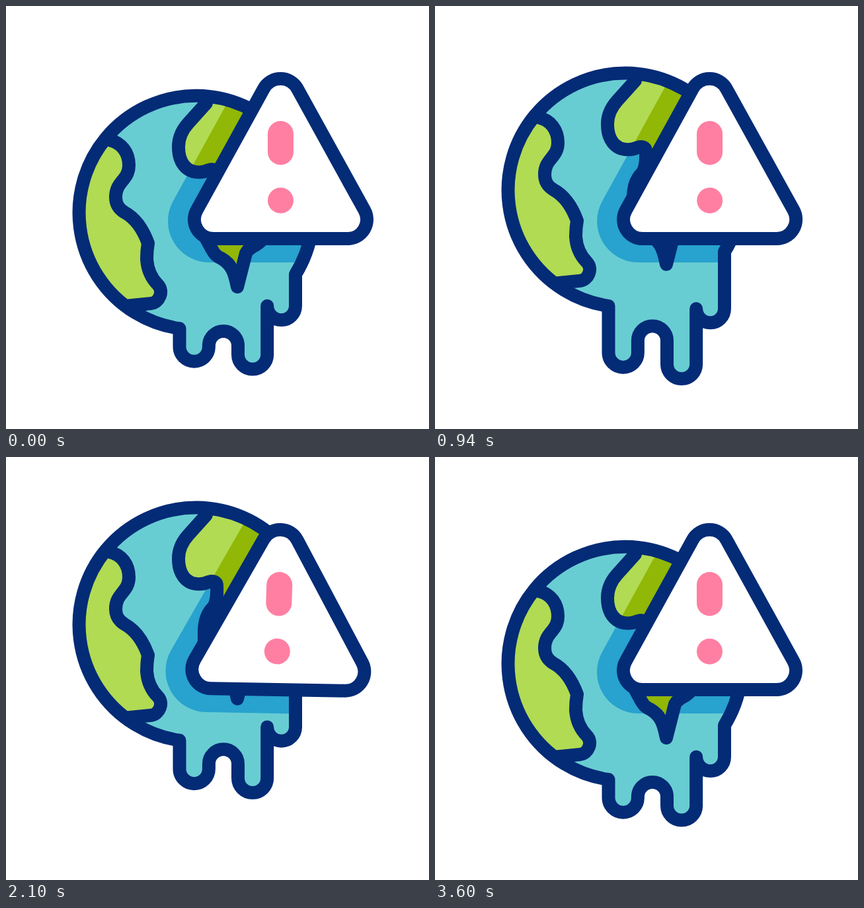
Animation, 640 px wide and 640 px high, one loop 3.62 s. Source, as an HTML page:

```html
<!DOCTYPE html>
<html lang="en">
<head>
<meta charset="utf-8">
<title>Melting globe warning</title>
<style>
  html, body { margin: 0; width: 100%; height: 100%; overflow: hidden; background: #fff; }
  svg { display: block; width: 100vw; height: 100vh; }
  .line { fill: none; stroke: #042b76; stroke-width: 20; stroke-linecap: round; stroke-linejoin: round; }
</style>
</head>
<body>
<svg viewBox="0 0 640 640">
  <defs>
    <path id="west" d="M157 203C175 207 186 222 186 241C186 264 166 265 166 289C166 301 171 307 179 312C194 320 207 337 215 359C213 370 213 377 213 383C214 399 219 411 230 422C239 432 232 448 220 450L180 454"/>
    <path id="east" d="M303 147L276 177C266 188 261 200 261 213C261 236 272 251.500 292 251.500C299 251.500 303 250 307 248C314 246 319 248 319 254C319.500 268 319 278 314 286C302 297 300 311 300 324V347L312 369C316 376 319 379 326 382C342 391 346 405 350 425L363 374C368 364 378 364 386 355L440 300"/>
    <path id="eastLand" d="M303 147L276 177C266 188 261 200 261 213C261 236 272 251.500 292 251.500C299 251.500 303 250 307 248C314 246 319 248 319 254C319.500 268 319 278 314 286C302 297 300 311 300 324V347L312 369C316 376 319 379 326 382C342 391 346 405 350 425L363 374C368 364 378 364 386 355L465 313.400A177 177 0 0 0 303 137Z"/>
    <path id="shade" d="M252.800 295.300A62.500 62.500 0 0 0 307.500 388H600V60H382.500Z"/>
    <clipPath id="bodyClip"><path class="body"/></clipPath>
    <clipPath id="eastClip"><use class="globe" href="#eastLand"/></clipPath>
  </defs>
  <path class="body" fill="#68cdd2"/>
  <g clip-path="url(#bodyClip)">
    <use class="swing" href="#shade" fill="#28a2ce"/>
    <g class="globe">
      <path fill="#b1db53" d="M157 203C175 207 186 222 186 241C186 264 166 265 166 289C166 301 171 307 179 312C194 320 207 337 215 359C213 370 213 377 213 383C214 399 219 411 230 422C239 432 232 448 220 450L180 454A177 177 0 0 1 157 203Z"/>
      <use href="#eastLand" fill="#b1db53"/>
    </g>
    <g clip-path="url(#eastClip)"><use class="swing" href="#shade" fill="#91b707"/></g>
    <g class="globe line">
      <use href="#west"/>
      <use href="#east"/>
    </g>
  </g>
  <path class="body line"/>
  <g class="swing">
    <path class="line" style="fill:#fff" d="M390 125A29 29 0 0 1 440.800 125L542.400 309A29 29 0 0 1 517 352H314A29 29 0 0 1 288.600 309Z"/>
    <g id="bang" fill="#ff7fa2">
      <rect x="396" y="174" width="39" height="66.500" rx="19.500"/>
      <circle cx="415.500" cy="294.200" r="19.500"/>
    </g>
  </g>
</svg>
<script>
const LOOP = 3620, END = 3600;
const $$ = s => document.querySelectorAll(s);
const bodies = $$('.body'), globes = $$('.globe'), swings = $$('.swing');
const bang = document.getElementById('bang');

const smooth = s => s * s * (3 - 2 * s);

// cubic-bezier(1/6, 0, 2/3, 1)
function quickStart(x) {
  let lo = 0, hi = 1;
  for (let i = 0; i < 24; i++) {
    const u = (lo + hi) / 2, v = 1 - u;
    if (u * v * v / 2 + 2 * u * u * v + u * u * u < x) lo = u; else hi = u;
  }
  return smooth(lo);
}

// evenly spaced keys, eased between neighbours
function keyed(t, values, ease = () => smooth) {
  const n = values.length - 1;
  const p = t / END * n;
  const i = Math.min(Math.floor(p), n - 1);
  return values[i] + (values[i + 1] - values[i]) * ease(i)(p - i);
}

function bodyPath(dy, melt) {
  const y = (base, grow = 0) => (base + dy + grow * melt).toFixed(2);
  const right = y(453.7, 38.7), mid = y(527.5, 49), gap = y(514, 26.6), left = y(515.5, 43.4);
  return `M438 ${y(406)}A177 177 0 1 0 262.500 ${y(488)}` +
    `V${left}A22.200 22.200 0 0 0 306.900 ${left}V${gap}` +
    `A22 22 0 0 1 351 ${gap}V${mid}A22.100 22.100 0 0 0 395.200 ${mid}V${right}` +
    `A21.400 21.400 0 0 0 438 ${right}Z`;
}

function draw(time) {
  const t = Math.min(time % LOOP, END);
  const dy = keyed(t, [0, -64, 0]);
  const melt = keyed(t, [0, 1, 0, 1, 0], i => i === 2 ? quickStart : smooth);
  const angle = keyed(t, [0, 12, -8, 6, -4, 2, 0]);
  const d = bodyPath(dy, melt);
  bodies.forEach(e => e.setAttribute('d', d));
  globes.forEach(e => e.setAttribute('transform', `translate(0 ${dy})`));
  swings.forEach(e => e.setAttribute('transform', `rotate(${angle} 415.500 110.500)`));
  bang.setAttribute('transform', `rotate(${angle} 415.500 174)`);
}

const start = performance.now();
function tick() {
  draw(performance.now() - start);
  requestAnimationFrame(tick);
}
draw(0);
requestAnimationFrame(tick);
</script>
</body>
</html>
```
